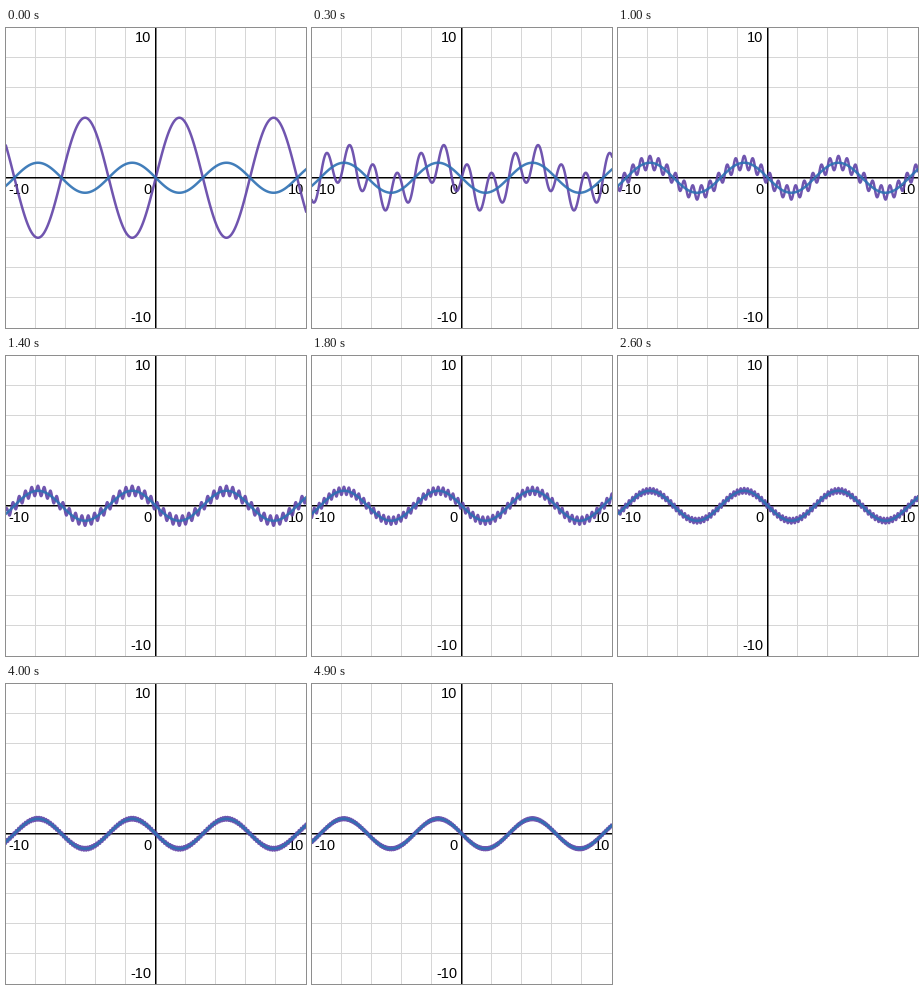
Animation of 300x300 px, one loop 5000 ms. Source, as a matplotlib script:

```python
import matplotlib.pyplot as plt
import numpy as np
from matplotlib.animation import FuncAnimation

SIZE, DPI = 300, 100
FRAMES, INTERVAL = 50, 100
UNIT, CENTER = 15, 149.75
PURPLE, BLUE = "#6042a6", "#2d70b3"

plt.rcParams["path.simplify"] = False


def px(width):
    """Pixels to points."""
    return width * 72 / DPI


fig = plt.figure(figsize=(SIZE / DPI, SIZE / DPI), dpi=DPI, facecolor="white")
ax = fig.add_axes([0, 0, 1, 1])
ax.set_xlim(0, SIZE)
ax.set_ylim(SIZE, 0)
ax.axis("off")


def cross_lines(pos, color, width):
    for xs, ys in (([pos, pos], [0, SIZE]), ([0, SIZE], [pos, pos])):
        ax.plot(xs, ys, color=color, lw=px(width), snap=False, zorder=1)


for k in range(-4, 5):
    if k:
        cross_lines(149.5 + 30 * k, "#d6d6d6", 1)
cross_lines(CENTER, "black", 1.5)

LABELS = [("10", 145.5, 14), ("-10", 145.5, 294), ("0", 145.5, 166),
          ("-10", 23.5, 166), ("10", 298.5, 166)]
for text, right, base in LABELS:
    ax.text(right, base, text, ha="right", va="baseline", color="black",
            family="Liberation Sans", size=px(14.5), zorder=2)

x = np.linspace(-10.2, 10.2, 6001)


def curve(color):
    return ax.plot([], [], color=color, lw=px(2.5), alpha=0.9, snap=False,
                   solid_joinstyle="round", zorder=3)[0]


wave = curve(PURPLE)
base_wave = curve(BLUE)
base_wave.set_data(CENTER + UNIT * x, CENTER + UNIT * np.sin(x))


def update(i):
    n = i + 1
    y = 5 / n * np.sin(n * x) - np.sin(x)
    wave.set_data(CENTER + UNIT * x, CENTER - UNIT * y)
    return wave, base_wave


anim = FuncAnimation(fig, update, frames=FRAMES, interval=INTERVAL,
                     repeat=True, repeat_delay=0)
plt.show()
```
